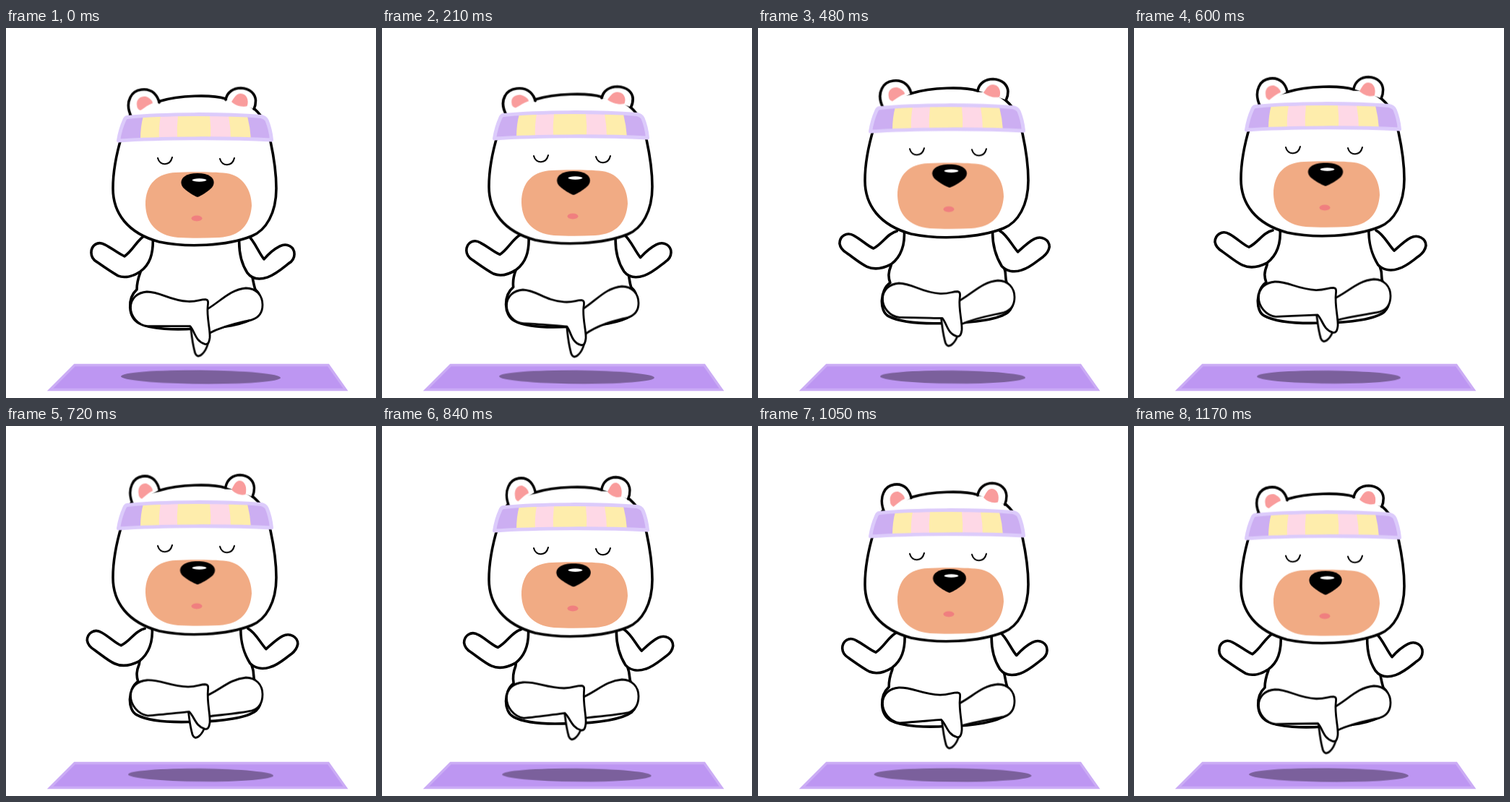
An HTML page without scripts that plays this animation: 512x512 px, repeating every 1.2 s.

```html
<!DOCTYPE html>
<html lang="en">
<head>
<meta charset="utf-8">
<title>Floating bear</title>
<style>
  html, body { margin: 0; width: 100%; height: 100%; overflow: hidden; background: #fff; }
  svg { display: block; width: 100vw; height: 100vh; }

  .line { fill: #fff; stroke: #000; stroke-width: 3.6; stroke-linejoin: round; stroke-linecap: round; }
  .thin { stroke-width: 2.8; }
  .eye { fill: none; stroke: #000; stroke-width: 2.1; stroke-linecap: round; }
  .yellow { fill: #feedac; }
  .rose { fill: #fed8e6; }
  .inner { fill: #f99c9c; }

  /* Every part swings between two poses; --lag is when it sits in the first one. */
  .move {
    animation: swing 600ms cubic-bezier(.364, 0, .636, 1) calc(var(--lag) - 1200ms) infinite alternate;
  }
  @keyframes swing { from { transform: var(--a); } to { transform: var(--b); } }

  .shadow { --lag: 0ms; --a: rotate(.5deg); --b: rotate(.5deg) scale(.9, .95); transform-origin: 269.5px 483px; }
  .skull { --lag: 35ms; --a: none; --b: translateY(-13px); }
  .face { --lag: 35ms; --a: none; --b: translateY(-15px); }
  .nose { --lag: 35ms; --a: none; --b: scale(1.07, .97); transform-origin: 265px 217px; }

  .ear { --lag: 260ms; }
  .ear.left { --a: scale(1.05, .95); --b: scale(.93, 1.05); transform-origin: 212px 118px; }
  .ear.right { --a: scale(1.04, .96); --b: scale(.94, 1.02); transform-origin: 303px 118px; }
  .inner { --lag: 260ms; --a: scale(1.07, .94); --b: scale(.86, 1.14); }
  .inner.left { transform-origin: 203px 105px; }
  .inner.right { transform-origin: 312px 101px; }

  .leg.left { --lag: 35ms; --a: none; --b: translateY(-14px); }
  .leg.right { --lag: 35ms; --a: none; --b: translateY(-12.5px); }
  .foot { --lag: 120ms; --a: translateY(1px); --b: translate(-4px, -24px); }

  /* Parts that bend: the first pose is the path's own outline. */
  .bend.left { --lag: 260ms; animation-name: bend-left; }
  .bend.right { --lag: 210ms; animation-name: bend-right; }
  .body { --lag: -30ms; animation-name: breathe; }
  .arm { --lag: 35ms; }
  .arm.left { animation-name: lift-left; }
  .arm.right { animation-name: lift-right; }
  @keyframes bend-left {
    to { d: path("M196 414.5 C182 412 172.5 399 172.5 387 C172.5 374 182 366 195 365 C215 364 225 372 252 373 C265 372.5 268 369.5 276 369.5 C280 370 280 372 279.5 378 C278 394 283 412 282 422 C281 430 279 432 275 431 C262 427 261 415 253 407.5 C240 409 215 413 196 414.5 Z"); }
  }
  @keyframes bend-right {
    to { d: path("M272 387 C295 379 308 362 332 360 C346 360 355 370 355 383 C355 396 350 403 340 406 C325 409 303 411 281 413"); }
  }
  @keyframes breathe {
    to { d: path("M202 270 C190 300 185 318 184 328 C180 338 180 344 183 352 C168 362 168 392 180 398 C200 409 235 409 262 408 C300 408 335 402 346 393 C356 384 356 362 344 352 C342 346 343 340 342 336 C335 315 330 290 328 270 Z"); }
  }
  @keyframes lift-left {
    to { d: path("M192 280 C178 283 172 297 159 303 C151 300 143 291 132 285 C122 279 112 286 112 296 C113 302 117 306 122 309 C132 316 141 324 150 328 C161 333 174 330 184 325 C197 315 204 300 202 276"); }
  }
  @keyframes lift-right {
    to { d: path("M335 280 C345 285 351 298 360 308 C367 302 375 294 383 290 C393 285 404 291 404 301 C403 307 400 311 395 315 C385 322 377 330 366 333 C354 337 344 334 338 328 C330 315 324 300 325 276"); }
  }
</style>
</head>
<body>
<svg viewBox="0 0 512 512">
  <path d="M95 466.5H446L470 500.5H61Z" fill="#bd96f2" stroke="#cbacf5" stroke-width="3.5"/>
  <ellipse class="move shadow" cx="269.5" cy="483" rx="110.5" ry="9.5" fill="#7b609c"/>

  <path class="line move body" d="M200 285 C190 310 187 330 186 338 C183 346 181 352 181 362 C168 374 168 400 185 409 C200 417 235 418 262 416 C300 416 330 410 345 400 C356 390 356 372 345 362 C343 356 342 350 341 345 C335 325 330 300 328 285 Z"/>

  <path class="line thin move foot" d="M255 400 C256 418 258 437 262 451 C264 456 267 456 270 454 C277 449 281 438 282 424 V400"/>
  <g class="move leg right">
    <path class="line thin move bend right" d="M272 395 C295 382 308 362 332 360 C346 360 355 370 355 383 C355 394 350 400 340 403 C325 407 303 411 281 426"/>
  </g>
  <g class="move leg left">
    <path class="line thin move bend left" d="M196 411.5 C182 411 172.5 398 172.5 387 C172.5 374 182 366 195 365 C215 366 225 380 252 382 C265 383 268 379.5 276 379.5 C280 380 280 383 279 389 C277 404 283 423 282 433 C281 440 279 442.5 275 441.5 C262 438 262 424 256 416 C240 415 215 412 196 411.5 Z"/>
  </g>

  <path class="line move arm left" d="M194 286 C181 293 176 308 164 316 C155 312 147 305 137 300 C127 294 118 301 118 311 C118 317 121 321 126 324 C136 331 146 338 155 343 C165 347 177 343 186 337 C198 328 205 314 203 286"/>
  <path class="line move arm right" d="M334 286 C344 295 349 310 357 320 C363 313 371 306 379 302 C389 297 399 303 399 313 C399 319 396 323 391 326 C381 334 373 341 362 345 C350 349 340 347 334 339 C326 327 321 312 323 286"/>

  <path class="line move skull" d="M160 150 C166 120 178 108 212 101.5 C240 93 285 92 304 98 C325 98 340 105 353 122 C360 132 363 144 366 157 C371 180 374 200 374 222 C374 256 360 280 340 288 C305 302 250 304 212 296 C168 284 148 256 148 222 C148 200 151 180 160 150 Z"/>

  <g class="move face">
    <g class="move ear left">
      <path class="line" d="M174 124 C168 112 168 104 172 96 C178 83 196 82 205 90 C209 94 211 98 212 103"/>
    </g>
    <path class="move inner left" d="M181 108 C179 99 186 94 193 95 C199 97 203 101 203 104 C197 106 192 110 186 114 C183 113 181 111 181 108 Z"/>
    <g class="move ear right">
      <path class="line" d="M304 99 C306 88 315 82.5 325 82.5 C338 83 345 91 345.5 100 C345.5 105 345 108 343 112"/>
    </g>
    <path class="move inner right" d="M312 102 C316 97 318 91 325 91 C333 91 337 100 334 108 C327 110 317 107 312 102 Z"/>

    <path id="band" d="M168 123.5 C220 118.5 300 118.5 353 122.5 Q359 124 361 128 Q366 140 367.5 155 C310 152 215 152 155.5 156 Q158 140 164 127 Q165 124 168 123.5 Z" fill="#ccaef2"/>
    <path class="yellow" d="M190 122H334Q338 138 339 154H186Q186 136 190 122Z"/>
    <path class="rose" d="M214 122H238Q236 138 237 154H212Q211 138 214 122ZM282 122H308Q311 138 311 154H283Q284 138 282 122Z"/>
    <use href="#band" fill-opacity="0" stroke="#dccbfb" stroke-width="5" stroke-linejoin="round"/>

    <path class="eye" d="M210 180C213 191.500 227 191 230 179M296 181C299 192.500 313 192 316 180"/>
    <path d="M193 245 C193 215 210 201 235 200 C255 199 285 199 305 201 C328 204 340 225 340 246 C338 272 325 288 295 290 C275 291 255 291 238 290 C208 287 194 270 193 245 Z" fill="#f1ab84"/>
    <path class="move nose" d="M265 234 C262 233.500 248 225 244.500 220 C239 212 244 201 265 201 C286 201 291 212 285.500 220 C282 225 268 233.500 265 234 Z"/>
    <ellipse cx="267.5" cy="210.5" rx="10" ry="2.2" fill="#fff"/>
    <ellipse cx="264" cy="263.5" rx="7.5" ry="3.9" fill="#f07f7f"/>
  </g>
</svg>
</body>
</html>
```
